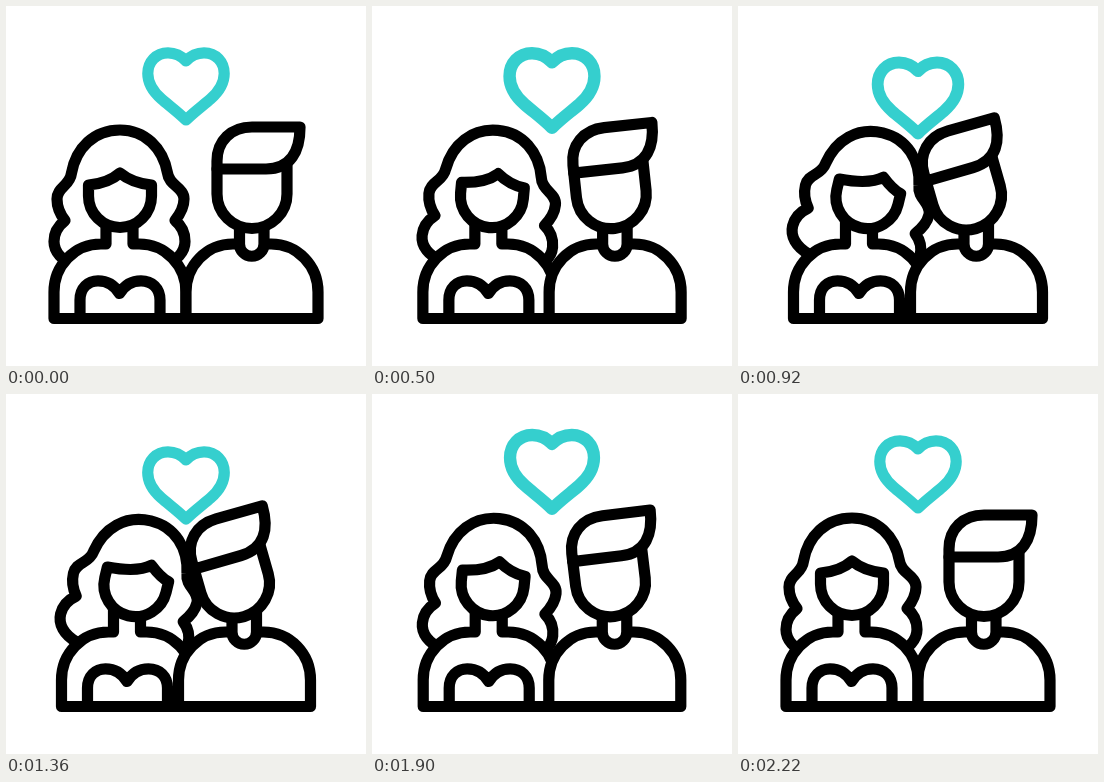
Animation of 360 by 360 pixels, one loop 2.4 s. Source, as an HTML page with a canvas:

```html
<!DOCTYPE html>
<html lang="en">
<head>
<meta charset="utf-8">
<title>Leaning couple</title>
<style>
html, body { margin: 0; width: 100%; height: 100%; overflow: hidden; background: #fff; }
canvas { display: block; width: 360px; height: 360px; }
</style>
</head>
<body>
<canvas id="stage"></canvas>
<script>
const LOOP = 2400, START = 220, SPAN = 2000;
const INK = '#000', TEAL = '#35cfce';
const canvas = document.getElementById('stage');
const ctx = canvas.getContext('2d');
const dpr = window.devicePixelRatio || 1;
canvas.width = canvas.height = 360 * dpr;

const shape = d => new Path2D(d);

const heart = shape('M180 55C175 49.5 169 46.8 162 46.8C150 46.8 141.8 56 141.8 67.5' +
  'C141.8 78 147.5 86 155.5 93C163 99.5 172 106 180 114' +
  'C188 106 197 99.5 204.5 93C212.5 86 218.2 78 218.2 67.5' +
  'C218.2 56 210 46.8 198 46.8C191 46.8 185 49.5 180 55Z');

// the parting slides sideways as the head turns
function womanFace(lean) {
  const x = 114 + 11 * lean;
  return shape(`M82.5 179V190A31.5 31.5 0 0 0 145.5 190V179` +
    `Q${x + 12} 177 ${x} 167Q${x - 12} 177.5 82.5 179Z`);
}

const woman = {
  pivot: [113.5, 224], angle: 13.5, shift: 7.5,
  hair: shape('M70 259C56 255 48 246 48 235.5C48 227 52 220 59 214.5C53 207 51 200 51 193' +
    'C51 181 64 180 65.5 167C70 142 88 124 114 124' +
    'C139 124 157 142 161.5 167C163 180 178 181 178 193C178 201 175 207 169 214.5' +
    'C176 220 179 227 179 235.5C179 246 171 255 157 259'),
  body: shape('M100 212V238H95C68.5 238 48 259.5 48 286V312.5H180V286C180 259.5 159.5 238 133 238H127V212'),
  trim: shape('M74 312V294C74 282 82 274.8 92 274.8C102 274.8 109 280 113.5 287.5' +
    'C118 280 125 274.8 135 274.8C146 274.8 154 282 154 294V312'),
  head: lean => [womanFace(lean)]
};

const manHead = [
  shape('M211 163V188A35 34.5 0 0 0 281 188V152'),
  shape('M211 163V155C211 135 225 121 246 121H294C294 145 285 163 260 163Z')
];

const man = {
  pivot: [246, 224], angle: -16, shift: -7.5,
  body: shape('M233.5 238H227C200.5 238 180 259.5 180 286V312.5H312V286C312 259.5 291.5 238 265 238H258'),
  collar: shape('M233.5 218V238A12.25 12.25 0 0 0 258 238V218'),
  head: () => manHead
};

const clamp = x => Math.min(1, Math.max(0, x));
const ease = (t, from, to) => {
  const u = clamp((t - from) / (to - from));
  return u * u * (3 - 2 * u);
};

function pulse(t) {
  // three quick beats, then two slower ones
  const slow = t > 1152;
  const len = slow ? 424 : 384;
  const u = ((slow ? t - 1152 : t) % len) / len;
  return 1 + 0.2 * ease(1 - Math.abs(2 * u - 1), 0, 1);
}

function stroke(path, color, fill) {
  if (fill) {
    ctx.fillStyle = '#fff';
    ctx.fill(path);
  }
  ctx.strokeStyle = color;
  ctx.stroke(path);
}

function tilted(p, lean, draw) {
  const [x, y] = p.pivot;
  ctx.save();
  ctx.translate(x, y);
  ctx.rotate(p.angle * lean * Math.PI / 180);
  ctx.translate(-x, -y);
  draw();
  ctx.restore();
}

function person(p, lean) {
  ctx.save();
  ctx.translate(p.shift * lean, 0);
  if (p.hair) tilted(p, lean, () => stroke(p.hair, INK));
  stroke(p.body, INK, true);
  if (p.trim) stroke(p.trim, INK);
  if (p.collar) stroke(p.collar, INK, true);
  tilted(p, lean, () => p.head(lean).forEach(part => stroke(part, INK, true)));
  ctx.restore();
}

function drawHeart(t) {
  const y = 11.6 * ease(t, 0, 700) - 14.1 * ease(t, 1105, 1410) + 2.5 * ease(t, 1690, SPAN);
  const s = pulse(t);
  ctx.save();
  ctx.translate(180, 80.5 + y);
  ctx.scale(s, s);
  ctx.translate(-180, -80.5);
  stroke(heart, TEAL);
  ctx.restore();
}

function render(now) {
  const t = Math.min(SPAN, Math.max(0, now % LOOP - START));
  const lean = ease(t, 0, 667) - ease(t, 1295, SPAN);
  ctx.setTransform(dpr, 0, 0, dpr, 0, 0);
  ctx.fillStyle = '#fff';
  ctx.fillRect(0, 0, 360, 360);
  ctx.lineWidth = 11.2;
  ctx.lineCap = ctx.lineJoin = 'round';
  person(woman, lean);
  person(man, lean);
  drawHeart(t);
}

const origin = performance.now();
function tick() {
  render(performance.now() - origin);
  requestAnimationFrame(tick);
}
tick();
</script>
</body>
</html>
```
